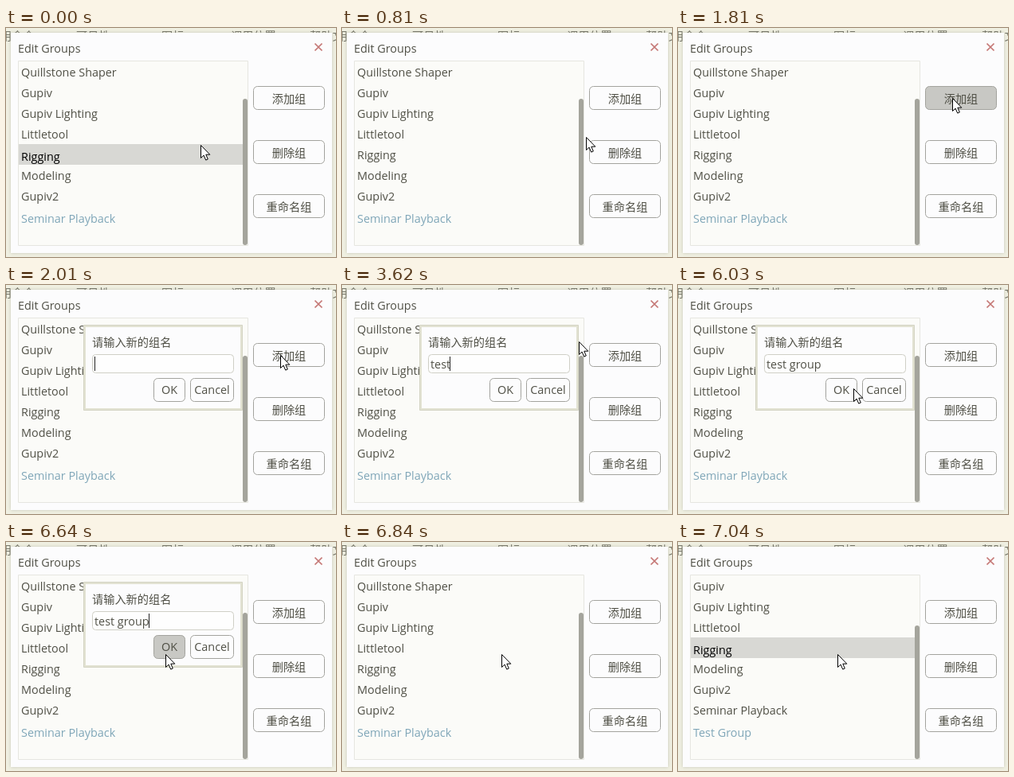
An HTML page with a canvas that plays this animation: 414x288 px, repeating every 8.65 s.

```html
<!DOCTYPE html>
<html lang="zh">
<head>
<meta charset="utf-8">
<title>Edit Groups</title>
<style>
html, body { margin: 0; width: 100%; height: 100%; overflow: hidden; }
canvas { display: block; width: 414px; height: 288px; }
</style>
</head>
<body>
<canvas id="stage" width="414" height="288"></canvas>
<script>
const ctx = document.getElementById('stage').getContext('2d');
const LOOP = 8650, STEPS = 43;
const INK = '#505046', HOVER = '#d8d8d4', PRESSED = '#c8c8c4', PAPER = '#fcfcfd';
const LATIN = '14.4px "Open Sans", "Noto Sans", sans-serif';
const HAN = '14.2px "Noto Sans CJK SC", "Noto Sans CJK", sans-serif';

const groups = ['Quillstone Shaper', 'Gupiv', 'Gupiv Lighting', 'Littletool', 'Rigging',
  'Modeling', 'Gupiv2', 'Seminar Playback', 'Test Group'];

// Each track lists [step, value]; a value holds until the next entry.
const pointer = [[0, [244, 147]], [4, [306, 137]], [5, [335, 104]], [6, [344, 88]],
  [11, [338, 84]], [12, [322, 78]], [13, [306, 73]], [14, [297, 71]],
  [28, [276, 90]], [29, [243, 118]], [30, [220, 130]], [31, [213, 134]],
  [32, [204, 139]], [33, [200, 141]]];
const typing = [[10, ''], [14, 't'], [15, 'te'], [16, 'tes'], [18, 'test'], [21, 'test g'],
  [22, 'test gr'], [23, 'test gro'], [24, 'test grou'], [26, 'test group']];
const latest = (track, step) => track.filter(([start]) => start <= step).pop();

function rect(x, y, w, h, fill) {
  ctx.fillStyle = fill;
  ctx.fillRect(x, y, w, h);
}

function text(str, x, y, { font = LATIN, color = INK, align = 'left' } = {}) {
  ctx.font = font;
  ctx.fillStyle = color;
  ctx.textAlign = align;
  ctx.fillText(str, x, y);
}

function box(x, y, w, h, radius, fill, stroke) {
  ctx.beginPath();
  ctx.roundRect(x + 0.5, y + 0.5, w - 1, h - 1, radius);
  ctx.fillStyle = fill;
  ctx.fill();
  ctx.lineWidth = 1;
  ctx.strokeStyle = stroke;
  ctx.stroke();
}

function button(label, x, y, w, h, font, fill = PAPER) {
  box(x, y, w, h, 5, fill, '#a3a39e');
  const baseline = y + h / 2 + (font === HAN ? 6 : 5);
  text(label, x + w / 2, baseline, { font, align: 'center' });
}

function drawWindow() {
  rect(0, 0, 414, 288, '#f0f0e2');
  [['用命令', -7], ['可见性', 88], ['图标', 195], ['调用位置', 282], ['帮助文', 381]]
    .forEach(([label, x]) => text(label, x, 15, { font: HAN, color: '#77776a' }));
  ctx.shadowColor = 'rgba(100, 100, 85, .3)';
  ctx.shadowBlur = 4;
  rect(6, 6, 403, 277, PAPER);
  ctx.shadowBlur = 0;
  text('Edit Groups', 15, 31);
  ctx.beginPath();
  ctx.moveTo(387.5, 19.5);
  ctx.lineTo(396.5, 28.5);
  ctx.moveTo(396.5, 19.5);
  ctx.lineTo(387.5, 28.5);
  ctx.lineWidth = 1.7;
  ctx.strokeStyle = '#c47674';
  ctx.stroke();
}

function drawList(step) {
  const added = step >= 35;
  const visible = added ? groups.slice(1) : groups.slice(0, -1);
  const hovered = step < 4 || added ? visible.indexOf('Rigging') : -1;
  box(15, 41, 289, 233, 0, '#fbfbf8', '#e6e6e0');
  visible.forEach((name, i) => {
    const isHovered = i === hovered, isLast = i === visible.length - 1;
    if (isHovered) rect(16, 42 + i * 26, 281, 26, HOVER);
    text(name, 19, 61 + i * 26 + (isHovered || isLast ? 2 : 0),
      { color: isHovered ? '#000' : isLast ? '#7fa6b8' : INK });
  });
  const top = added ? 105 : 89;
  ctx.beginPath();
  ctx.roundRect(297, top, 6, 273 - top, 3);
  ctx.fillStyle = '#a4a49c';
  ctx.fill();
}

function drawPrompt(step) {
  box(97, 50, 200, 108, 0, '#e2e2d2', '#d4d4c4');
  rect(100, 53, 194, 102, PAPER);
  text('请输入新的组名', 108, 77, { font: HAN });
  box(108, 87, 178, 24, 4, '#fefefe', '#cfcfc6');

  const [typedAt, typed] = latest(typing, step);
  text(typed, 111, 105);
  const idle = (step - typedAt) * LOOP / STEPS;
  if (idle % 1060 < 530) {
    rect(Math.round(111 + ctx.measureText(typed).width) - (typed ? 1 : 0), 90, 1, 18, '#222');
  }
  button('OK', 185, 117, 40, 30, LATIN, step >= 33 ? PRESSED : step >= 31 ? HOVER : PAPER);
  button('Cancel', 231, 117, 55, 30, LATIN);
}

function drawPointer(step) {
  const [x, y] = latest(pointer, step)[1];
  const outline = [[0, 0], [0, 16], [3.6, 12.6], [6.2, 18.6], [8.8, 17.5], [6.3, 11.7], [11.3, 11.7]];
  ctx.beginPath();
  outline.forEach(([dx, dy]) => ctx.lineTo(x + dx + 0.5, y + dy + 0.5));
  ctx.closePath();
  ctx.fillStyle = '#fff';
  ctx.fill();
  ctx.lineWidth = 1;
  ctx.strokeStyle = '#000';
  ctx.stroke();
}

function draw() {
  const step = Math.floor(((performance.now() % LOOP) + 5) * STEPS / LOOP) % STEPS;
  drawWindow();
  drawList(step);
  const addFill = step === 9 ? PRESSED : step >= 6 && step < 9 ? HOVER : PAPER;
  button('添加组', 310, 73, 90, 30, HAN, addFill);
  button('删除组', 310, 141, 90, 30, HAN);
  button('重命名组', 310, 209, 90, 30, HAN);
  if (step >= 10 && step < 34) drawPrompt(step);
  drawPointer(step);
  requestAnimationFrame(draw);
}
draw();
</script>
</body>
</html>
```
